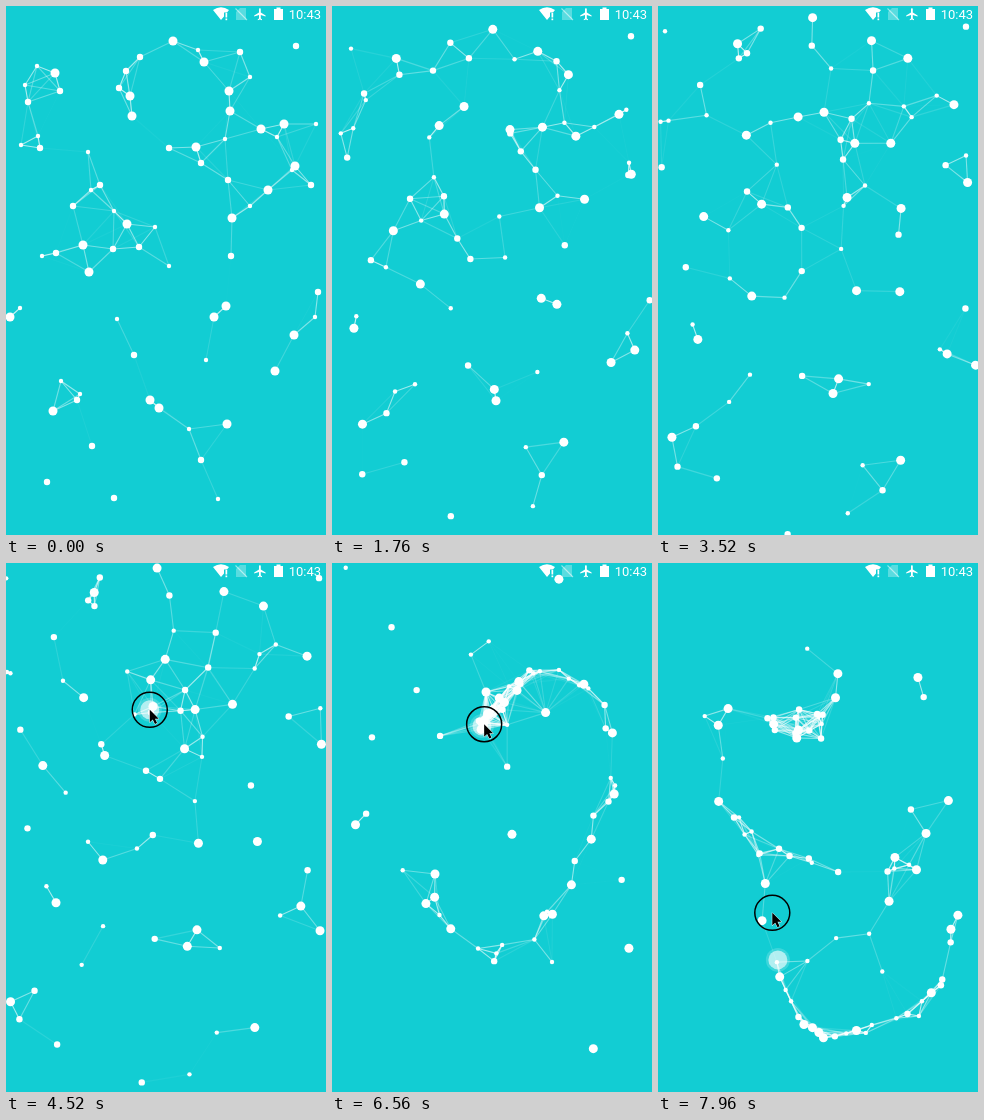
An HTML page with a canvas that plays this animation: 320x529 px, repeating every 8 s.

```html
<!DOCTYPE html>
<html lang="en">
<head>
<meta charset="utf-8">
<title>Constellation touch</title>
<style>
  html, body { margin: 0; width: 100%; height: 100%; overflow: hidden; background: #12cdd3; }
  canvas { display: block; width: 320px; height: 529px; }
</style>
</head>
<body>
<canvas id="stage" width="320" height="529"></canvas>
<script>
const W = 320, H = 529, LOOP = 8000;
const LINK = 51;            // longest link between two dots
const TOUCH_START = 4500;
const STEP = 16;            // one dot is moved under the finger per step
const WAYPOINT_TIME = 120;
const CURSOR_LEAD = 60;     // the finger mark trails behind the pointer
const ctx = document.getElementById('stage').getContext('2d');

// Start points by drift quadrant, in small/medium/large triples. Within a
// quadrant the heading turns steadily; triples alternate fast and slow.
const swarms = [
  { sx: 1, sy: -1, from: 30, to: 54, at: [
    149,221, 107,243, 144,394,  286,164, 67,200, 153,402,
    85,184, 120,65, 208,311,  163,260, 22,96, 269,365,
    82,146, 163,142, 49,67,  74,388, 290,40, 278,118,
    219,133, 54,85, 223,85,  111,313, 225,250, 198,56] },
  { sx: 1, sy: 1, from: 32, to: 66, at: [
    36,250, 94,179, 4,311,  14,302, 312,286, 289,160,
    19,79, 195,454, 288,329,  55,375, 128,349, 124,90,
    183,423, 108,492, 221,418,  200,354, 133,241, 83,266] },
  { sx: -1, sy: 1, from: 27, to: 50, at: [
    108,205, 34,142, 126,110,  212,493, 50,247, 255,123,
    244,71, 71,394, 47,405,  192,44, 234,46, 262,184,
    309,311, 86,440, 224,105] },
  { sx: -1, sy: -1, from: 29, to: 62, at: [
    244,200, 222,174, 226,212,  32,130, 41,476, 220,300,
    310,118, 134,51, 77,239,  271,131, 305,179, 121,218,
    31,60, 113,82, 190,141,  15,139, 195,157, 167,35] }
];

const waypoints = [
  [144,147], [90,105], [40,138], [30,195], [37,250], [66,314], [116,364], [178,388],
  [228,340], [255,283], [273,231], [275,170], [250,124], [212,108], [180,128], [158,150],
  [150,160], [150,163], [148,158], [98,148], [56,158], [63,222], [92,282], [165,299],
  [240,300], [292,345], [280,428], [208,467], [142,458], [115,365], [122,290]
];

const dots = swarms.flatMap(({ sx, sy, from, to, at }) => {
  const count = at.length / 2;
  return Array.from({ length: count }, (_, i) => {
    const triple = Math.floor(i / 3);
    const angle = (from + (to - from) * triple / (count / 3 - 1)) * Math.PI / 180;
    const speed = triple % 2 ? 0.0075 : 0.012;
    return {
      x: at[2 * i], y: at[2 * i + 1], r: [2.2, 3.2, 4.5][i % 3],
      vx: sx * speed * Math.cos(angle), vy: sy * speed * Math.sin(angle)
    };
  });
});

function random(n) {
  const v = Math.sin(n * 12.9898 + 4.137) * 43758.5453;
  return v - Math.floor(v);
}

// Reflects a coordinate at both edges.
function bounce(v, max) {
  const m = ((v % (2 * max)) + 2 * max) % (2 * max);
  return m > max ? 2 * max - m : m;
}

// Catmull-Rom curve through the waypoints.
function touchAt(time) {
  const last = waypoints.length - 1;
  const u = Math.max(0, Math.min(last, (time - 4520) / WAYPOINT_TIME));
  const i = Math.min(last - 1, Math.floor(u)), f = u - i;
  const point = k => waypoints[Math.max(0, Math.min(last, k))];
  return [0, 1].map(axis => {
    const [a, b, c, d] = [i - 1, i, i + 1, i + 2].map(k => point(k)[axis]);
    return b + f / 2 * (c - a + f * (2 * a - 5 * b + 4 * c - d + f * (3 * (b - c) + d - a)));
  });
}

function dotsAt(time) {
  const starts = dots.map(dot => ({ x: dot.x, y: dot.y, t: 0 }));
  for (let k = 0, t = TOUCH_START; t <= time; t = TOUCH_START + ++k * STEP) {
    const [x, y] = touchAt(t);
    starts[Math.floor(random(k) * dots.length)] = {
      x: x + (random(k + 500) - 0.5) * 8, y: y + (random(k + 900) - 0.5) * 8, t
    };
  }
  return dots.map((dot, i) => {
    const { x, y, t } = starts[i];
    return { x: bounce(x + dot.vx * (time - t), W), y: bounce(y + dot.vy * (time - t), H), r: dot.r };
  });
}

function disc(x, y, r, color) {
  ctx.fillStyle = color;
  ctx.beginPath();
  ctx.arc(x, y, r, 0, 7);
  ctx.fill();
}

function drawNetwork(points) {
  ctx.lineWidth = 1.1;
  points.forEach((a, i) => {
    for (const b of points.slice(i + 1)) {
      const distance = Math.hypot(a.x - b.x, a.y - b.y);
      if (distance >= LINK) continue;
      ctx.strokeStyle = `rgba(255,255,255,${1 - distance / LINK})`;
      ctx.beginPath();
      ctx.moveTo(a.x, a.y);
      ctx.lineTo(b.x, b.y);
      ctx.stroke();
    }
  });
  points.forEach(({ x, y, r }) => disc(x, y, r, '#fff'));
}

const wifi = new Path2D('M207 4Q215 -1.5 223 4L221 6.5H218V10.5L215 14Z');
const sim = new Path2D('M234 2H240V14H230V6Z');
const plane = new Path2D('M21 16v-2l-8-5V3.5c0-.8-.7-1.5-1.5-1.5S10 2.7 10 3.5V9l-8 5v2l8-2.5V19l-2 1.5V22l3.5-1 3.5 1v-1.5L13 19v-5.5z');
const arrow = new Path2D('M0 0V12.5L3 9.8L5.2 14.3L7.3 13.3L5.2 9H9Z');

function drawStatusBar() {
  ctx.fillStyle = '#fff';
  ctx.fill(wifi);
  ctx.fillRect(219.5, 7, 1.7, 4.5);
  ctx.fillRect(219.5, 12.5, 1.7, 1.7);
  ctx.fillRect(268, 3, 9, 11);
  ctx.fillRect(270.5, 1.5, 4, 2);
  ctx.save();
  ctx.translate(247, 1);
  ctx.scale(0.6, 0.6);
  ctx.fill(plane);
  ctx.restore();
  ctx.fillStyle = 'rgba(255,255,255,.3)';
  ctx.fill(sim);
  ctx.strokeStyle = 'rgba(255,255,255,.55)';
  ctx.beginPath();
  ctx.moveTo(229.5, 2.5);
  ctx.lineTo(241, 14);
  ctx.stroke();
  ctx.fillStyle = '#fff';
  ctx.font = '13px Roboto, sans-serif';
  ctx.textAlign = 'right';
  ctx.fillText('10:43', 315, 12.5);
}

function drawTouch(time) {
  const [x, y] = touchAt(time);
  disc(x, y, 12, 'rgba(255,255,255,.18)');
  disc(x, y, 9.5, 'rgba(255,255,255,.6)');

  const [cx, cy] = touchAt(time < 4540 ? time : time + CURSOR_LEAD);
  ctx.save();
  ctx.translate(cx, cy);
  ctx.strokeStyle = '#000';
  ctx.lineWidth = 1.5;
  ctx.beginPath();
  ctx.arc(0, 0, 17.5, 0, 7);
  ctx.stroke();
  ctx.strokeStyle = '#fff';
  ctx.lineWidth = 1;
  ctx.stroke(arrow);
  ctx.fillStyle = '#000';
  ctx.fill(arrow);
  ctx.restore();
}

const begin = performance.now();

function draw() {
  const time = (performance.now() - begin) % LOOP;
  ctx.fillStyle = '#12cdd3';
  ctx.fillRect(0, 0, W, H);
  drawNetwork(dotsAt(time));
  drawStatusBar();
  if (time >= TOUCH_START - 40) drawTouch(time);
  requestAnimationFrame(draw);
}
draw();
</script>
</body>
</html>
```
